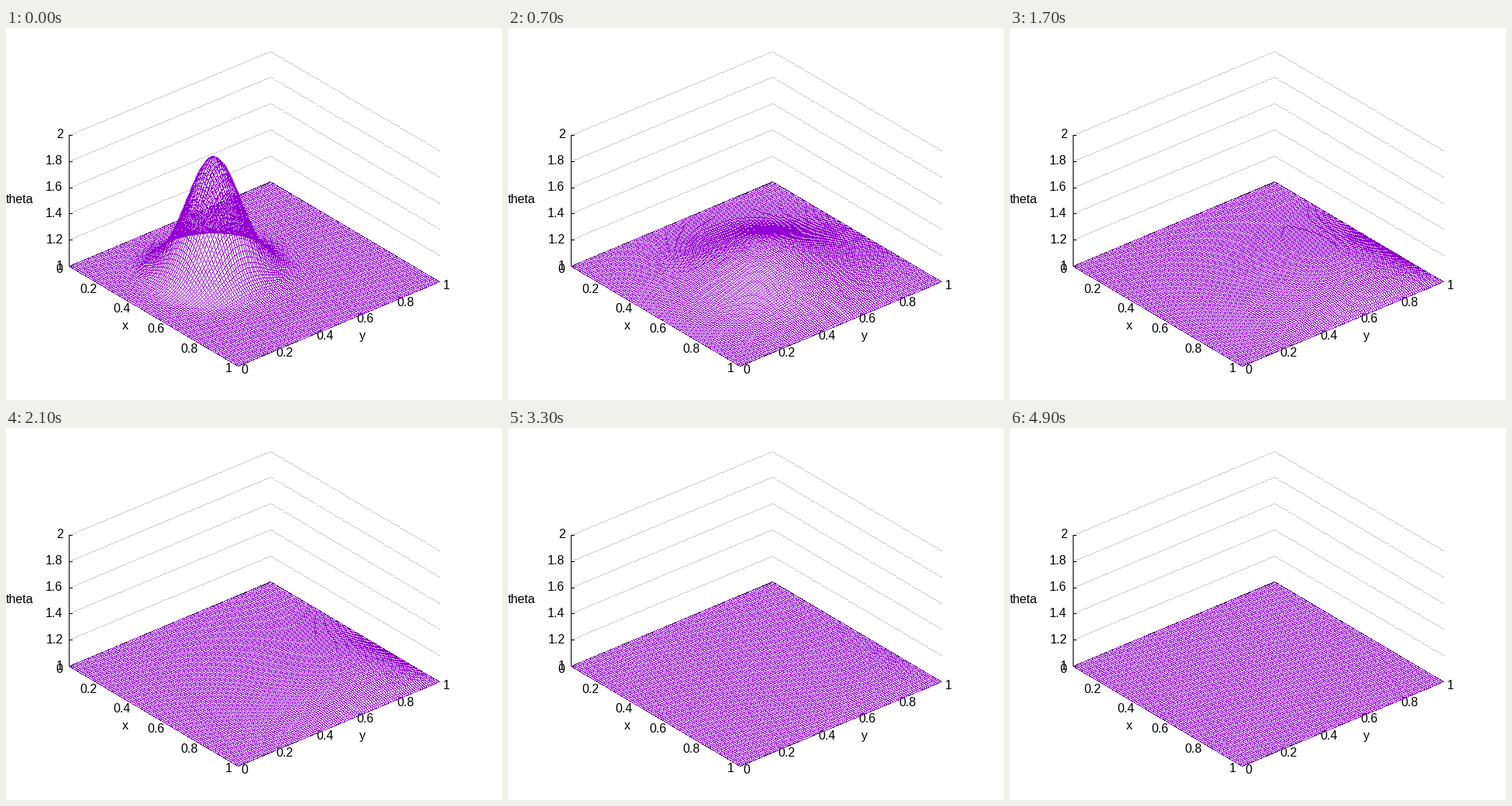
Animation of 640 by 480 pixels, one loop 5 s. Source, as a matplotlib script:

```python
import numpy as np
import matplotlib.pyplot as plt
from matplotlib.animation import FuncAnimation

W, H, DPI = 640, 480, 100
FRAMES, INTERVAL = 50, 100
CELLS = 100
PURPLE, GRAY, BLACK = (148, 0, 211), (160, 160, 160), (0, 0, 0)

# Flow of a warm bump on the unit square with cold edges
DIFFUSION, VELOCITY = 0.0025, 0.02
CENTER, SPREAD, PEAK = 0.39, 0.105, 0.88


def project(x, y, z):
    return 81 + 218 * x + 260 * y, 307 + 128.5 * x - 108.5 * y - 169 * (z - 1)


def step_matrix(substeps=20):
    """Propagator along one axis for a single frame; fixed zero ends."""
    n, h = CELLS - 1, 1 / CELLS
    up, down = np.eye(n, k=1), np.eye(n, k=-1)
    rate = DIFFUSION * (up + down - 2 * np.eye(n)) / h**2 - VELOCITY * (up - down) / (2 * h)
    return np.linalg.matrix_power(np.linalg.inv(np.eye(n) - rate / substeps), substeps)


def raster(img, x0, y0, x1, y1, color, on=1, period=1):
    """Draw one-pixel lines without smoothing, optionally dotted."""
    ends = [np.rint(np.ravel(v)).astype(int) for v in (x0, y0, x1, y1)]
    x0, y0, x1, y1 = (v[:, None] for v in ends)
    length = np.maximum(np.maximum(abs(x1 - x0), abs(y1 - y0)), 1)
    k = np.arange(length.max() + 1)[None, :]
    t = np.minimum(k / length, 1)
    px = np.floor(x0 + (x1 - x0) * t + 0.5).astype(int)
    py = np.floor(y0 + (y1 - y0) * t + 0.5).astype(int)
    keep = (k <= length) & (k % period < on)
    img[py[keep], px[keep]] = (*color, 255)


def blank():
    return np.zeros((H, W, 4), np.uint8)


def line(img, start, end, color, **dots):
    raster(img, *project(*start), *project(*end), color, **dots)


def draw_box():
    img = blank()
    for z in np.linspace(1.2, 2, 5):
        line(img, (0, 0, z), (0, 1, z), GRAY, on=1, period=2)
        line(img, (0, 1, z), (1, 1, z), GRAY, on=1, period=2)
    corners = [(0, 0, 1), (1, 0, 1), (1, 1, 1), (0, 1, 1)]
    for a, b in zip(corners, corners[1:] + corners[:1]):
        line(img, a, b, BLACK)
    line(img, (0, 0, 1), (0, 0, 2), BLACK)
    for z in np.linspace(1, 2, 6):
        x, y = project(0, 0, z)
        raster(img, x, y, x + 4, y, BLACK)
    return img


def label(x, baseline, text, ha="center"):
    ax.text(x, baseline, text, ha=ha, va="baseline", zorder=2,
            family="Liberation Sans", size=16 * 72 / DPI)


axis = np.linspace(0, 1, CELLS + 1)
gx, gy = np.meshgrid(axis, axis, indexing="ij")
bump = PEAK * np.exp(-((gx - CENTER)**2 + (gy - CENTER)**2) / (2 * SPREAD**2))
STEP = step_matrix()


def surface(frame):
    flow = np.linalg.matrix_power(STEP, frame)
    z = np.ones_like(gx)
    z[1:-1, 1:-1] += flow @ bump[1:-1, 1:-1] @ flow.T
    px, py = project(gx, gy, z)
    img = blank()
    raster(img, px[:-1], py[:-1], px[1:], py[1:], PURPLE)
    raster(img, px[:, :-1], py[:, :-1], px[:, 1:], py[:, 1:], PURPLE)
    return img


fig = plt.figure(figsize=(W / DPI, H / DPI), dpi=DPI, facecolor="white")
ax = fig.add_axes([0, 0, 1, 1])
ax.axis("off")
place = dict(extent=(0, W, H, 0), interpolation="nearest", aspect="auto")
ax.imshow(draw_box(), zorder=1, **place)
mesh = ax.imshow(surface(0), zorder=3, **place)

for v in np.linspace(0, 1, 6):
    x, y = project(v, 0, 1)
    label(x - 7.5, y + 9, f"{v:.1g}", "right")
    x, y = project(0, v, 1)
    x, y = project(1, v, 1)
    label(x + 8.7, y + 10, f"{v:.1g}")
    x, y = project(0, 0, 1 + v)
    label(x - 7.5, y + 4.5, f"{1 + v:.2g}", "right")
label(154, 389, "x")
label(460, 402, "y")
label(0, 226, "theta", "left")


def update(frame):
    mesh.set_data(surface(frame))
    return [mesh]


anim = FuncAnimation(fig, update, frames=FRAMES, interval=INTERVAL,
                     repeat=True, repeat_delay=0)
plt.show()
```
